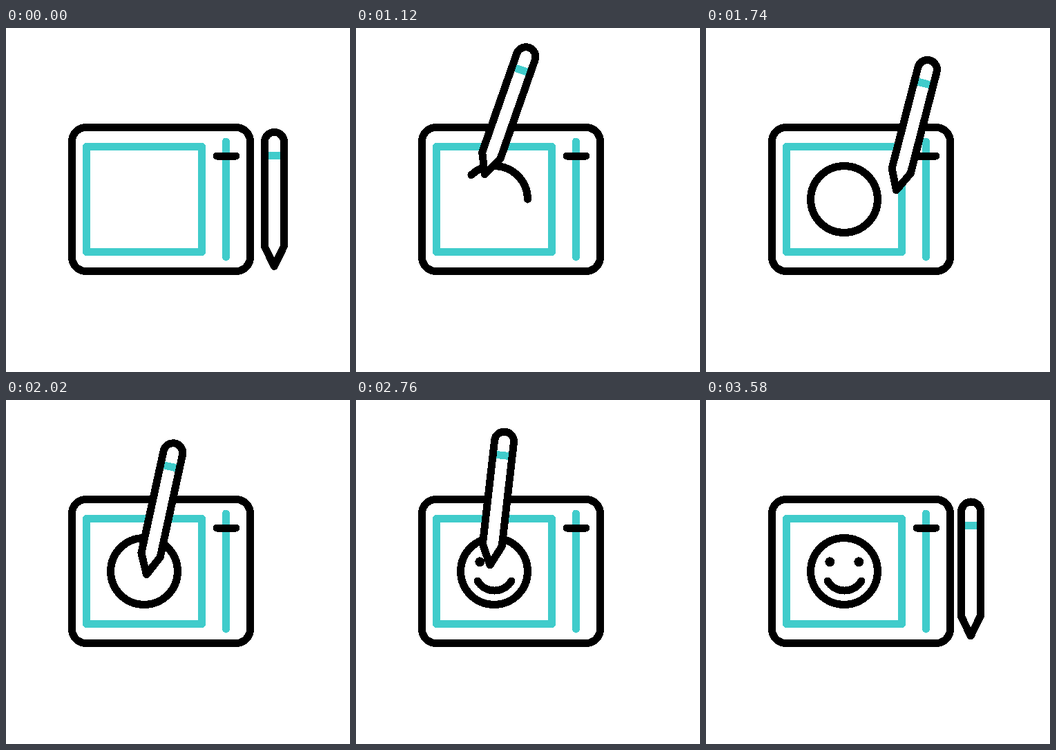
Recreate the animation shown at these times as an HTML page. Size 498 by 500 pixels, loop 3.6 s.

```html
<!DOCTYPE html>
<html lang="en">
<head>
<meta charset="utf-8">
<title>Drawing tablet</title>
<style>
  html, body { margin: 0; width: 100%; height: 100%; overflow: hidden; background: #fff; }
  svg { display: block; width: 100%; height: 100%; shape-rendering: crispEdges; }
  .ink, .teal { fill: none; stroke: #000; stroke-width: 11; stroke-linecap: round; stroke-linejoin: round; }
  .teal { stroke: #40cccb; }
</style>
</head>
<body>
<svg viewBox="0 0 498 500">
  <rect class="ink" x="95.5" y="144.5" width="258" height="209" rx="20.5"/>
  <rect class="teal" x="116.5" y="172.5" width="167" height="153"/>
  <path class="teal" d="M318.5 165V333"/>
  <path class="ink" d="M305 186H333"/>
  <path id="face" class="ink" pathLength="1" d="M248.5 249A48.5 48.5 0 0 0 151.5 249A48.5 48.5 0 0 0 248.5 249"/>
  <path id="mouth" class="ink" pathLength="1" d="M176 263A28.4 28.4 0 0 0 225 263"/>
  <circle id="eyeL" cx="179.3" cy="235.3" r="7"/>
  <circle id="eyeR" cx="221.3" cy="235.3" r="7"/>
  <g id="pen">
    <path fill="#fff" d="M-14 -29V-181A14 14 0 0 1 14 -181V-29L0 0Z"/>
    <path class="teal" style="stroke-linecap:butt" d="M-12 -160.5H12"/>
    <path class="ink" d="M-14 -29V-181A14 14 0 0 1 14 -181V-29L0 0Z"/>
  </g>
</svg>
<script>
const LOOP = 3600, TILT = 21.4, TURN = 840;
const $ = id => document.getElementById(id);
const face = $('face'), mouth = $('mouth'), eyeL = $('eyeL'), eyeR = $('eyeR'), pen = $('pen');

// Poses of the pen tip: time, x, y
const home = [388.5, 346.5];
const poses = [
  [0, ...home],
  [820, 247.5, 254],    // around the face
  [1035, 209, 204],
  [1270, 157, 247],
  [1430, 182, 293],
  [1590, 245.5, 301],
  [1768, 276.5, 231.5],
  [2120, 186, 263],     // along the mouth
  [2360, 232.2, 275],
  [2425, 248, 267],
  [2650, 181.5, 242],   // left eye, right eye
  [3000, 221, 235.5],
  [LOOP, ...home]
];
const last = poses.length - 2;

const slope = (i, c) => (poses[i + 1][c] - poses[i][c]) / (poses[i + 1][0] - poses[i][0]);

// Harmonic mean of neighbouring slopes, flat at turning points
function tangent(i, c) {
  const a = slope(i - 1, c), b = slope(i, c);
  return a * b > 0 ? 2 * a * b / (a + b) : 0;
}

// Straight when travelling from home, between the eyes and back; curved while sketching
function along(t, c) {
  let i = last;
  while (poses[i][0] > t) i--;
  const [p, q] = [poses[i], poses[i + 1]];
  const d = q[0] - p[0], u = (t - p[0]) / d, v = 1 - u;
  if (i === 0 || i >= last - 1) return p[c] * v + q[c] * u;
  return p[c] * v * v * (1 + 2 * u) + q[c] * u * u * (3 - 2 * u)
    + d * u * v * (tangent(i, c) * v - tangent(i + 1, c) * u);
}

const ramp = (t, a, b) => Math.min(1, Math.max(0, (t - a) / (b - a)));

function trim(el, p) {
  el.style.visibility = p > 0 ? 'visible' : 'hidden';
  el.setAttribute('stroke-dasharray', p < 1 ? `${p} 2` : 'none');
}

function draw(t) {
  trim(face, ramp(t, 840, 1600));
  trim(mouth, ramp(t, 2100, 2432));
  eyeL.setAttribute('r', 7 * ramp(t, 2620, 2700));
  eyeR.setAttribute('r', 7 * ramp(t, 2940, 3020));
  const angle = TILT * Math.min(t / TURN, (LOOP - t) / (LOOP - TURN));
  pen.setAttribute('transform', `translate(${along(t, 1)} ${along(t, 2)}) rotate(${angle})`);
}

const start = performance.now();
function tick() {
  draw(Math.max(0, performance.now() - start) % LOOP);
  requestAnimationFrame(tick);
}
draw(0);
requestAnimationFrame(tick);
</script>
</body>
</html>
```
